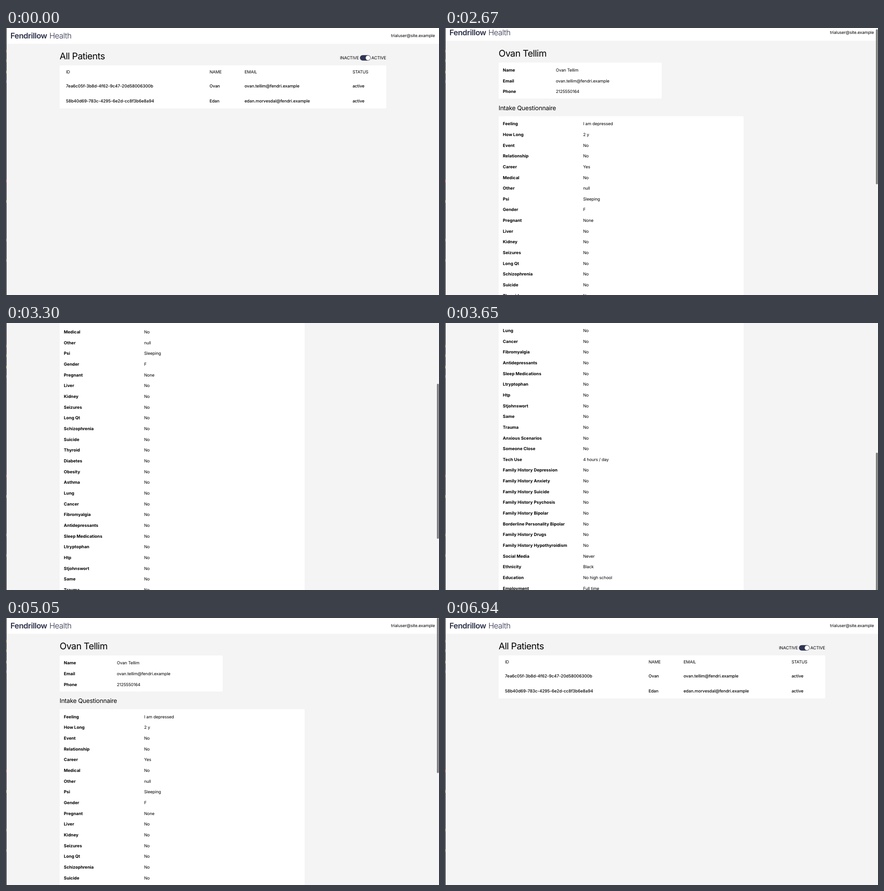
Recreate the animation shown at these times as an HTML page. Size 953 by 588 pixels, loop 8 s.

```html
<!DOCTYPE html>
<html lang="en">
<head>
<meta charset="utf-8">
<title>Patients</title>
<style>
  html, body { margin: 0; width: 100%; height: 100%; overflow: hidden; background: #f4f4f4; }
  svg { display: block; width: 100%; height: 100%; }
  text {
    font: 400 9.25px Inter, "Liberation Sans", sans-serif;
    letter-spacing: -.12px;
    font-optical-sizing: none;
    text-rendering: geometricPrecision;
    white-space: pre;
  }
  text.medium { font-weight: 500; letter-spacing: -.09px; }
  text.bold { font-size: 9.4px; font-weight: 700; letter-spacing: 0; }
  text.title { font-size: 20.2px; letter-spacing: -.53px; }
  text.sub { font-size: 13.5px; letter-spacing: -.24px; }
  text.brand { font-size: 17px; letter-spacing: -.45px; fill: #2b2f48; }
  text.strong { font-weight: 600; }
  text.light { font-weight: 300; }
</style>
</head>
<body>
<svg id="stage" viewBox="0 0 953 588"></svg>
<script>
const LOOP = 8000, STEP = 70;
const PITCH = 23.66, FIRST_ROW = 220.7;
const THUMB_RATIO = 0.4236, THUMB_HEIGHT = 341.5;

const OPEN = 1410, CLOSE = 6940;

// [time, scroll offset]
const SCROLL = [
  [2600, 0], [2670, 6.5], [2810, 70], [3020, 195], [3160, 268], [3370, 340],
  [3440, 340], [3510, 375], [3580, 505], [3650, 674], [3720, 890], [3790, 1100],
  [4700, 1100], [4770, 1094], [4840, 960], [4910, 620], [4980, 220], [5050, 0]
];

// "Label=Value"; a missing value means "No"
const ANSWERS = `Feeling=I am depressed|How Long=2 y|Event|Relationship|Career=Yes|Medical|
Other=null|Psi=Sleeping|Gender=F|Pregnant=None|Liver|Kidney|Seizures|Long Qt|Schizophrenia|
Suicide|Thyroid|Diabetes|Obesity|Asthma|Lung|Cancer|Fibromyalgia|Antidepressants|
Sleep Medications|Ltryptophan|Htp|Stjohnswort|Same|Trauma|Anxious Scenarios|Someone Close|
Tech Use=4 hours / day|Family History Depression|Family History Anxiety|Family History Suicide|
Family History Psychosis|Family History Bipolar|Borderline Personality Bipolar|
Family History Drugs|Family History Hypothyroidism|Social Media=Never|Ethnicity=Black|
Education=No high school|Employment=Full time|General Health=Good|Panic Attack|
Previous Depression=Never|Cholesterol|Arrhythmia|Heart Condition|Eating Disorder|Chronic Pain|
Ibd Crohns|Smoke|Drink|Sleep=Normal|Sleep Issue Snoring|Sleep Issue Pauses In Breathing|
Sleep Issue Waking Up Gasping|Cold All The Time|Hair Loss|Constipation`
  .split("|").map(s => s.trim().split("="));

const PATIENTS = [
  ["7ea6c05f-3b8d-4f62-9c47-20d58006300b", "Ovan", "ovan.tellim@fendri.example", "active"],
  ["58b40d69-783c-4295-6e2d-cc8f3b6e8a94", "Edan", "edan.morvesdal@fendri.example", "active"]
];
const COLUMNS = [132, 448, 525, 762.7];

const stage = document.getElementById("stage");

function add(parent, tag, attrs, content) {
  const el = document.createElementNS("http://www.w3.org/2000/svg", tag);
  for (const k in attrs) el.setAttribute(k, attrs[k]);
  if (content) el.textContent = content;
  parent.appendChild(el);
  return el;
}
const group = parent => add(parent, "g", {});
const rect = (parent, x, y, width, height, fill, rx = 0) =>
  add(parent, "rect", { x, y, width, height, fill, rx });
const label = (parent, x, y, str, cls = "", anchor = "start") =>
  add(parent, "text", { x, y, class: cls, "text-anchor": anchor }, str);

function buildHeader(g) {
  rect(g, 0, 0, 953, 34.7, "#fff");
  label(g, 9.8, 22.5, "Fendrillow", "brand strong");
  label(g, 95.4, 22.5, "Health", "brand light");
  label(g, 944, 19.5, "trialuser@site.example", "", "end");
}

function buildList(g) {
  label(g, 118, 69, "All Patients", "title");
  label(g, 735, 69.2, "INACTIVE");
  rect(g, 779, 59.8, 23.6, 12, "#2f3552", 6);
  add(g, "circle", { cx: 796.7, cy: 65.8, r: 5.1, fill: "#fff" });
  label(g, 836.8, 69.2, "ACTIVE", "", "end");
  rect(g, 118, 82.3, 719, 95, "#fff", 2.4);
  ["ID", "NAME", "EMAIL", "STATUS"].forEach((s, i) => label(g, COLUMNS[i], 100.2, s));
  PATIENTS.forEach((row, r) =>
    row.forEach((s, i) => label(g, COLUMNS[i], 131.4 + r * 33, s, "medium")));
}

function buildRows(g, rows, y, valueX) {
  rows.forEach(([name, value = "No"], i) => {
    label(g, 127.3, y + i * PITCH, name, "bold");
    label(g, valueX, y + i * PITCH, value);
  });
}

function buildDetail(g) {
  label(g, 118, 69, "Ovan Tellim", "title");
  rect(g, 118, 82.5, 359, 79.6, "#fff", 2.4);
  buildRows(g, [
    ["Name", "Ovan Tellim"],
    ["Email", "ovan.tellim@fendri.example"],
    ["Phone", "2125550164"]
  ], 102.4, 244);
  label(g, 118, 187.2, "Intake Questionnaire", "sub");
  rect(g, 118, 200.8, 539.3, 1660, "#fff", 2.4);
  buildRows(g, ANSWERS, FIRST_ROW, 304);
}

rect(stage, 0, 0, 953, 588, "#f4f4f4");
const page = group(stage);
buildHeader(page);
const list = group(page);
buildList(list);
const detail = group(page);
buildDetail(detail);
const thumb = rect(stage, 948.4, 0, 4.2, THUMB_HEIGHT, "#7c7c7c", 2.1);

// Sliver of the window behind, at the left edge
rect(stage, 0, 0, 1.2, 588, "#23232a");
[[51, "#8a5428"], [72, "#77703a"], [97, "#8b8a35"], [118, "#4b5a80"],
 [337, "#b5322c"], [382, "#85803a"], [467, "#6d6238"], [512, "#6d6238"]]
  .forEach(([y, color]) => rect(stage, 0, y - 3, 1, 6, color));

function scrollAt(t) {
  const i = SCROLL.findIndex(k => k[0] > t);
  if (i < 0) return SCROLL[SCROLL.length - 1][1];
  if (i === 0) return 0;
  const [t0, y0] = SCROLL[i - 1], [t1, y1] = SCROLL[i];
  return y0 + (y1 - y0) * (t - t0) / (t1 - t0);
}

// Fades out in equal steps of the screen's refresh
const fade = (t, start, steps) =>
  Math.max(0, Math.min(1, 1 - (Math.floor((t - start) / STEP) + 1) / steps));

function thumbAlpha(t) {
  if (t < 2670) return 0;
  return t < 4770 ? fade(t, 4420, 3) : fade(t, 5610, 4);
}

function draw(t) {
  const open = t >= OPEN && t < CLOSE;
  const held = 2600 + Math.floor((t - 2600) / STEP) * STEP;
  const y = scrollAt(held);
  list.setAttribute("display", open ? "none" : "inline");
  detail.setAttribute("display", open ? "inline" : "none");
  page.setAttribute("transform", `translate(0 ${-y})`);
  thumb.setAttribute("y", y * THUMB_RATIO);
  thumb.setAttribute("opacity", thumbAlpha(t));
}

const begin = performance.now();
function tick() {
  draw((performance.now() - begin) % LOOP);
  requestAnimationFrame(tick);
}
tick();
</script>
</body>
</html>
```
